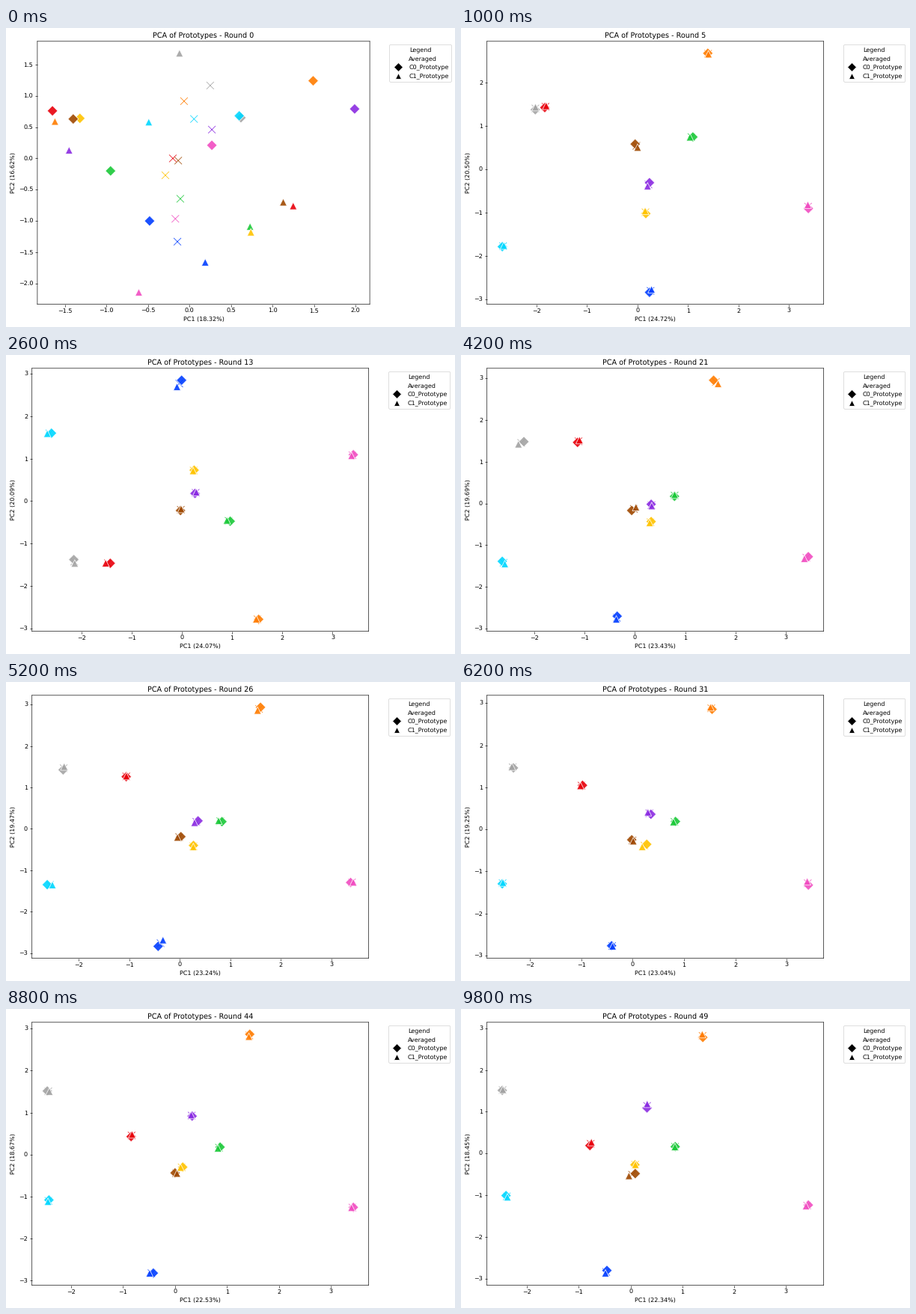
A matplotlib script for the animation above (10000 ms loop, 600x400 px).

```python
import numpy as np
import matplotlib.pyplot as plt
from matplotlib.animation import FuncAnimation
from matplotlib.lines import Line2D

W, H, ROUNDS, STEP_MS = 600, 400, 50, 200
K = 0.58  # scale of all point sizes

BASE = {
    "font.size": 10, "axes.linewidth": 0.8, "axes.titlepad": 6,
    "axes.labelpad": 4, "lines.markeredgewidth": 1, "lines.linewidth": 1.5,
    "patch.linewidth": 1,
}
for side in ("xtick", "ytick"):
    BASE.update({f"{side}.major.size": 3.5, f"{side}.major.width": 0.8,
                 f"{side}.major.pad": 3.5})
plt.rcParams.update({name: size * K for name, size in BASE.items()})
plt.rcParams.update({"font.family": "DejaVu Sans", "text.hinting": "none"})

STYLES = [("Averaged", "x"), ("C0_Prototype", "D"), ("C1_Prototype", "^")]

# Each class has two starting points, then one shared path after GATHERED.
GATHERED = 5
KNOTS = (0, GATHERED, 21, 49)
PC1 = (18.32, 24.72, 23.43, 22.34)
PC2 = (16.62, 20.50, 19.69, 18.45)
PATHS = {  # colour: C0 start, C1 start, shared key points
    "#023eff": [(-.48, -1.0), (.19, -1.66), (.26, -2.8), (-.36, -2.74), (-.47, -2.84)],
    "#ff7c00": [(1.49, 1.24), (-1.62, .59), (1.4, 2.66), (1.61, 2.91), (1.39, 2.82)],
    "#1ac938": [(-.95, -.2), (.73, -1.09), (1.07, .74), (.79, .19), (.86, .16)],
    "#e8000b": [(-1.65, .76), (1.25, -.76), (-1.82, 1.44), (-1.12, 1.49), (-.77, .23)],
    "#8b2be2": [(1.99, .79), (-1.45, .13), (.22, -.35), (.33, -.04), (.32, 1.14)],
    "#ffc400": [(-1.32, .64), (.74, -1.18), (.16, -.99), (.31, -.45), (.09, -.27)],
    "#9f4800": [(-1.4, .63), (1.13, -.7), (-.02, .54), (-.02, -.13), (.03, -.51)],
    "#f14cc1": [(.27, .21), (-.61, -2.14), (3.38, -.86), (3.41, -1.3), (3.41, -1.25)],
    "#a3a3a3": [(.62, .65), (-.12, 1.68), (-2.02, 1.4), (-2.26, 1.45), (-2.47, 1.52)],
    "#00d7ff": [(.6, .68), (-.49, .58), (-2.66, -1.77), (-2.61, -1.42), (-2.39, -1.03)],
}


def ease_time(rnd):
    """Prototypes gather quickly at first, then drift at an even pace."""
    if rnd >= GATHERED:
        return rnd
    return GATHERED * (1 - (1 - rnd / GATHERED) ** 3)


def along(t, points):
    return [np.interp(t, KNOTS, axis) for axis in zip(*points)]


def prototypes(rnd):
    """Positions of C0 and C1 of every class: shape (class, 2, 2)."""
    t = ease_time(rnd)
    pts = np.array([[along(t, [start, *path]) for start in (c0, c1)]
                    for c0, c1, *path in PATHS.values()])
    if rnd > 0:
        gap = np.random.default_rng(rnd).normal(0, 0.025, (len(PATHS), 2))
        pts += np.stack([gap, -gap], axis=1)
    if 9 <= rnd <= 16:  # the second component changes sign for a while
        pts[..., 1] *= -1
    return pts


fig = plt.figure(figsize=(W / 100, H / 100), dpi=100, facecolor="white")
ax = fig.add_axes([0.1, 0.1, 0.8, 0.8])


def place_axes(pts):
    # fractional tick labels on the y axis need a wider margin
    wide = np.ptp(pts[..., 1]) * 1.1 < 4.5
    left, right = (41.9, 486.1) if wide else (34.7, 484.6)
    top, bottom = 17.8, 369.6
    ax.set_position([left / W, 1 - bottom / H,
                     (right - left) / W, (bottom - top) / H])
    for spine in ax.spines.values():
        spine.set_snap(False)


def draw(rnd):
    ax.clear()
    pts = prototypes(rnd)
    place_axes(pts)

    layers = (pts.mean(axis=1), pts[:, 0], pts[:, 1])
    for (_, marker), xy in zip(STYLES, layers):
        edge = {} if marker == "x" else {"edgecolors": "white"}
        ax.scatter(xy[:, 0], xy[:, 1], s=150 * K * K, c=list(PATHS),
                   marker=marker, linewidths=K, alpha=0.9, **edge)

    ax.set_title(f"PCA of Prototypes - Round {rnd}")
    ax.set_xlabel(f"PC1 ({np.interp(rnd, KNOTS, PC1):.2f}%)")
    ax.set_ylabel(f"PC2 ({np.interp(rnd, KNOTS, PC2):.2f}%)")
    handles = [Line2D([0], [0], marker=marker, color="w", label=label,
                      markerfacecolor="black", markersize=10 * K)
               for label, marker in STYLES]
    ax.legend(handles=handles, title="Legend", loc="upper left",
              bbox_to_anchor=(1.05, 1))
    return []


anim = FuncAnimation(fig, draw, frames=ROUNDS, init_func=lambda: [],
                     interval=STEP_MS, repeat=True, repeat_delay=0)
plt.show()
```
